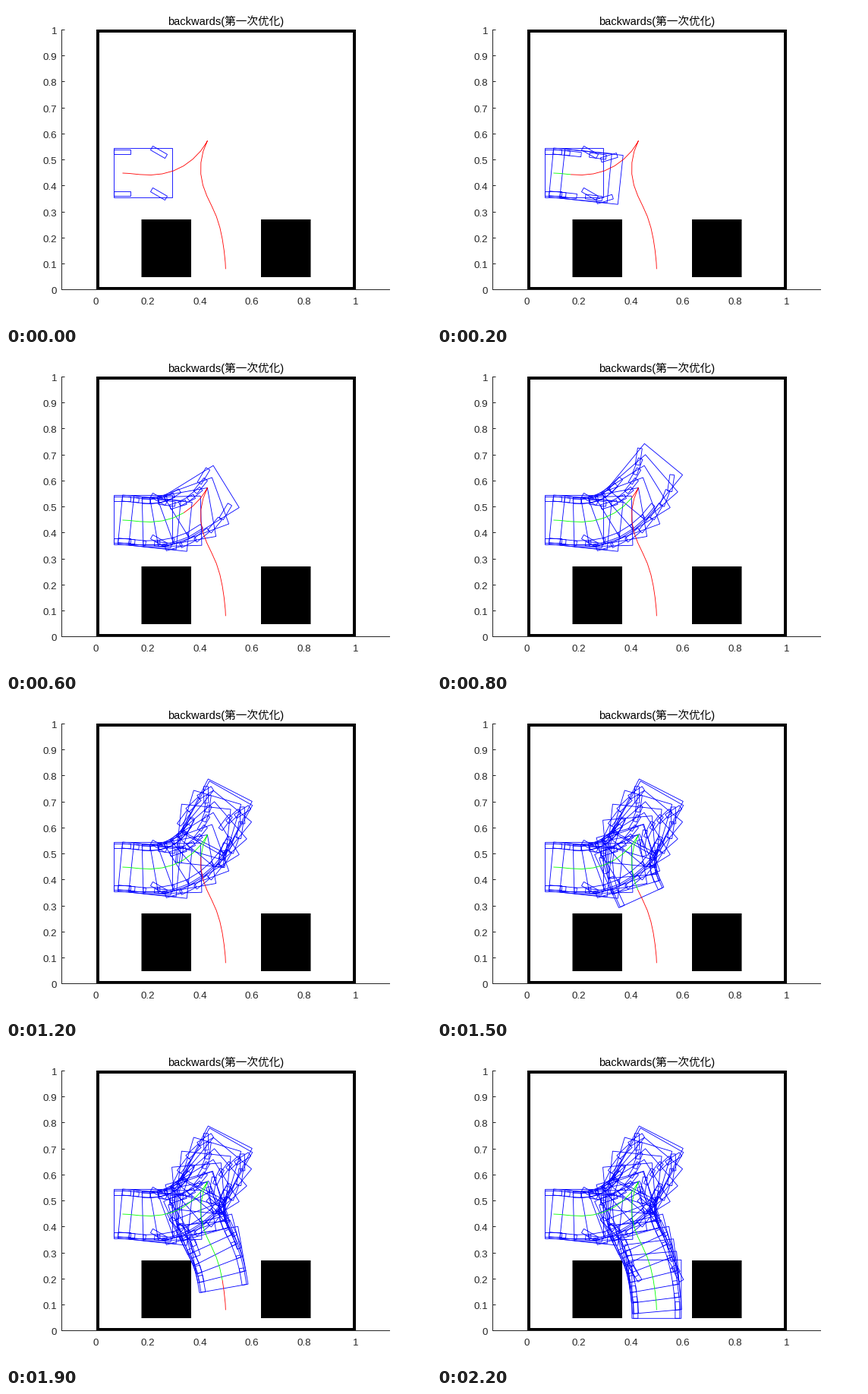
A matplotlib script for the animation above (3.3 s loop, 560 by 420 pixels).

```python
import numpy as np
import matplotlib.pyplot as plt
from matplotlib.animation import FuncAnimation
from matplotlib.patches import Polygon, Rectangle

plt.rcParams["path.snap"] = False

W, H, DPI = 560, 420, 100
PX = 72 / DPI                      # points per pixel
THIN = 0.85 * PX
LEFT, RIGHT, TOP, BOTTOM = 73.5, 506, 31, 373.5
X0, Y0, UNIT = 118.65, 373.8, 342.3
GREY = "#262626"
BLUE = (0, 0, 1)

# Car geometry in pixels, measured from the rear axle
BASE, REAR, FRONT, HALF = 48, 11, 66, 32.5
TRACK, WHEEL_L, WHEEL_H = 27.5, 11, 3

# Heading at each pose and signed distance between poses
HEADINGS = np.radians([0, -5.5, -6.1, 1.5, 10, 20, 31.7, 41, 50.6, 60.5, 63,
                       73.5, 84, 95, 106, 114.5, 117, 111,
                       104, 100, 97, 95, 90])
STEPS = np.array([8, 14.7] + [15] * 6 + [13, 3]
                 + [-15] * 7 + [-15.4] * 4 + [-8.8])


def drive():
    mid = (HEADINGS[:-1] + HEADINGS[1:]) / 2
    x = 153.5 + np.append(0, np.cumsum(STEPS * np.cos(mid)))
    y = 220 - np.append(0, np.cumsum(STEPS * np.sin(mid)))
    steer = np.arctan(BASE * np.diff(HEADINGS) / STEPS)
    limit = np.radians(31)
    return x, y, np.append(np.clip(steer, -limit, limit), np.radians(30))


def place(points, x, y, angle):
    """Rotate (forward, left) points and move them to (x, y) on screen."""
    f, l = np.asarray(points, float).T
    c, s = np.cos(angle), np.sin(angle)
    return np.column_stack([x + f * c - l * s, y - f * s - l * c])


def box(back, front, half):
    return [(back, -half), (front, -half), (front, half), (back, half)]


def car(x, y, heading, steer):
    shapes = [place(box(-REAR, FRONT, HALF), x, y, heading)]
    for along, turn in ((0, 0), (BASE, steer)):
        for side in (TRACK, -TRACK):
            cx, cy = place([(along, side)], x, y, heading)[0]
            wheel = box(-WHEEL_L, WHEEL_L, WHEEL_H)
            shapes.append(place(wheel, cx, cy, heading + turn))
    return [ax.add_patch(Polygon(s, fill=False, ec=BLUE, lw=THIN, zorder=5))
            for s in shapes]


def line(xs, ys, color, z, width=PX):
    return ax.plot(xs, ys, color=color, lw=width, zorder=z,
                   solid_capstyle="butt")[0]


def block(x, y, w, h):
    ax.add_patch(Rectangle((x, y), w, h, fc="black", lw=0, zorder=2))


def label(x, y, text, size, **kw):
    ax.text(x, y, text, fontsize=size * PX, va="baseline",
            family=["Liberation Sans", "Noto Sans CJK JP"], **kw)


fig = plt.figure(figsize=(W / DPI, H / DPI), dpi=DPI, facecolor="white")
ax = fig.add_axes([0, 0, 1, 1])
ax.set_xlim(0, W)
ax.set_ylim(H, 0)
ax.axis("off")

# Axes, ticks and labels
line([LEFT, LEFT], [TOP, BOTTOM + 0.5], GREY, 3)
line([LEFT, RIGHT], [BOTTOM, BOTTOM], GREY, 3)
for k in range(11):
    y = Y0 - k / 10 * UNIT
    tick = np.floor(y) + 0.5
    line([LEFT, LEFT + 4], [tick, tick], GREY, 3)
    label(67, y + 5.4, f"{k / 10:g}", 13.33, ha="right", color=GREY)
for k in range(0, 11, 2):
    label(X0 + k / 10 * UNIT, 393, f"{k / 10:g}", 13.33,
          ha="center", color=GREY)
label(290, 25, "backwards(第一次优化)", 14.67, ha="center", color="black")

# Walls and obstacles
block(119, 31, 4, 343)
block(457, 31, 4, 343)
block(119, 31, 342, 4)
block(119, 370, 342, 4)
block(178.5, 281, 65.5, 76)
block(336, 281, 65.5, 76)

px, py, steering = drive()
ahead = line([], [], "red", 6, THIN)
trail = line([], [], (0, 1, 0), 6, THIN)
cars = [car(*pose) for pose in zip(px, py, HEADINGS, steering)]


def update(i):
    last = min(i, len(cars) - 1)
    trail.set_data(px[:last + 1], py[:last + 1])
    ahead.set_data(px[last:], py[last:])
    for n, parts in enumerate(cars):
        for p in parts:
            p.set_visible(n <= last)
    return [ahead, trail]


anim = FuncAnimation(fig, update, frames=33, interval=100,
                     init_func=lambda: update(0), repeat=True)
plt.show()
```
